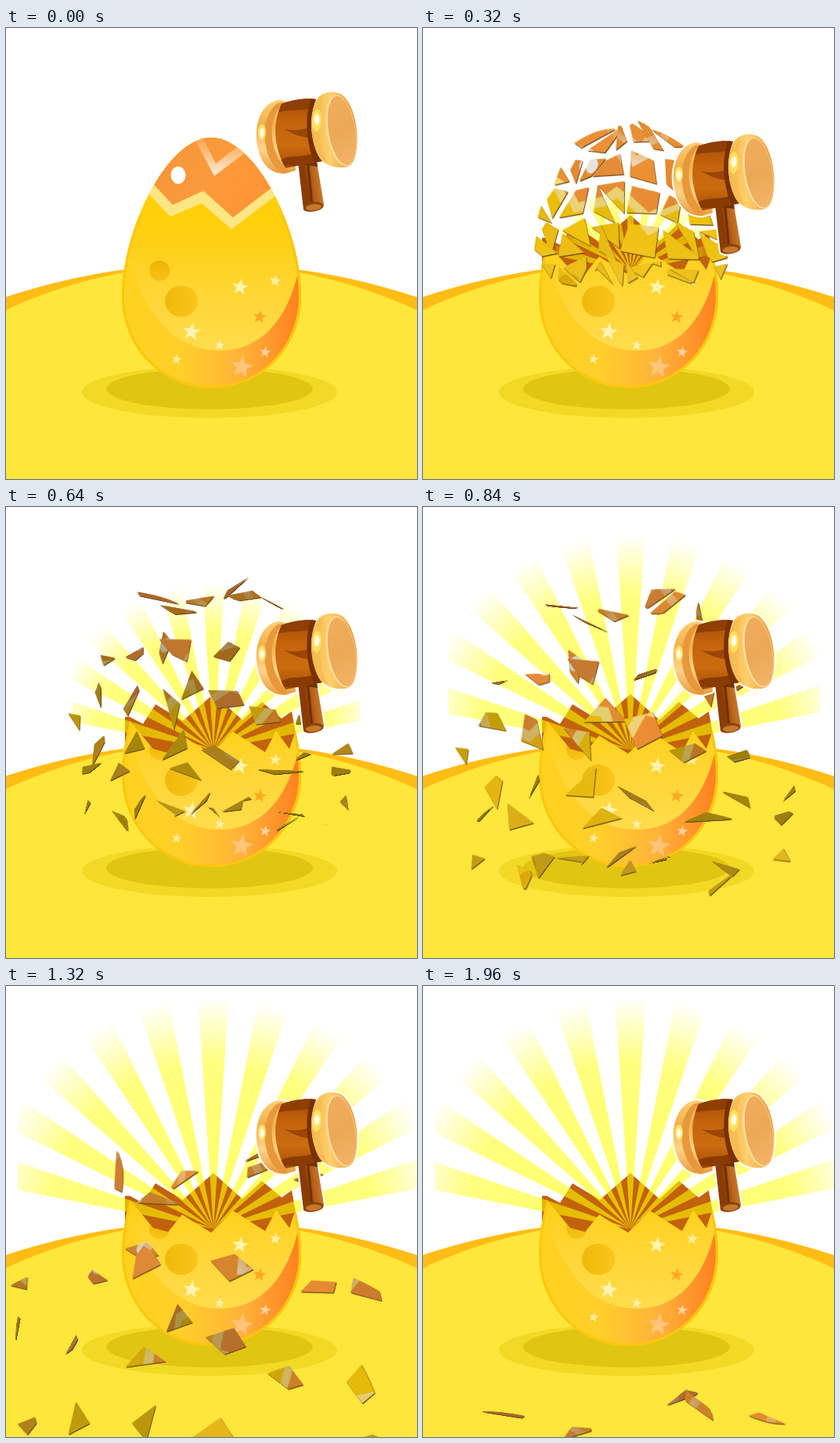
Write an HTML page with a canvas that moves like this. It is 525x576 px and loops after 2000 ms.

```html
<!DOCTYPE html>
<html lang="en">
<head>
<meta charset="utf-8">
<title>Golden egg</title>
<style>
  html, body { margin: 0; width: 100%; height: 100%; overflow: hidden; background: #fff; }
  canvas { display: block; }
</style>
</head>
<body>
<canvas id="stage" width="525" height="576"></canvas>
<script>
const W = 525, H = 576, LOOP = 2000, STEP = 40;
const BREAK = 0.2, GRAVITY = 470, TILE = 120;
const CX = 265, CY = 310;
const stage = document.getElementById('stage').getContext('2d');

const EGG = new Path2D('M262 140C205 140 148 260 148 342C148 408 198 460 262 460C327 460 377 408 377 342C377 260 320 140 262 140Z');
const RIM = 'M140 262L155 269L188 309L207 314L225 292L262 315L290 287L331 313L345 286L362 309L373 276L385 270';
const WALL = 'M152 268H158L175 277L191 252L226 273L265 239L302 272L327 249L352 270L365 261L372 300V320H152Z';

const rnd = (i, k) => {
  const v = Math.sin(i * 12.9898 + k * 78.233) * 43758.5453;
  return v - Math.floor(v);
};
const spread = (i, k, size) => (rnd(i, k) - 0.5) * size;

function layer(w, h, draw) {
  const c = document.createElement('canvas');
  c.width = w;
  c.height = h;
  draw(c.getContext('2d'));
  return c;
}

function poly(pts) {
  const p = new Path2D();
  pts.forEach(([x, y]) => p.lineTo(x, y));
  p.closePath();
  return p;
}

function fill(g, path, color) {
  g.fillStyle = color;
  g.fill(typeof path === 'string' ? new Path2D(path) : path);
}

function oval(g, x, y, rx, ry, color, tilt = 0) {
  g.beginPath();
  g.ellipse(x, y, rx, ry, tilt, 0, 7);
  g.fillStyle = color;
  g.fill();
}

function ramp(g, x0, y0, x1, y1, ...colors) {
  const r = g.createLinearGradient(x0, y0, x1, y1);
  colors.forEach((c, i) => r.addColorStop(i / (colors.length - 1), c));
  return r;
}

function star(g, x, y, r, color) {
  const pts = [];
  for (let i = 0; i < 10; i++) {
    const a = 0.15 + i * Math.PI / 5 - Math.PI / 2, d = i % 2 ? r * 0.42 : r;
    pts.push([x + d * Math.cos(a), y + d * Math.sin(a)]);
  }
  fill(g, poly(pts), color);
}

const ground = layer(W, H, g => {
  g.fillStyle = '#fff';
  g.fillRect(0, 0, W, H);
  oval(g, 262, 1130, 829, 829, '#ffbc14');
  oval(g, 262, 923, 621, 621, '#ffe63b');
  oval(g, 260, 465, 163, 33, '#f1d926');
  oval(g, 260, 461, 132, 26, '#e1c513');
});

const egg = layer(W, H, g => {
  g.clip(EGG);
  g.fillStyle = ramp(g, 148, 0, 377, 0, '#ffd21e', '#ffcf2a', '#ffb23a', '#ff7f1e');
  g.fillRect(140, 130, 250, 340);
  fill(g, 'M145 130H380V270C372 350 340 412 272 412C205 412 165 345 154 270Z',
    ramp(g, 0, 200, 0, 412, '#ffd000', '#ffcf14', '#ffd636', '#ffdc4c'));
  fill(g, 'M140 120H390V204H340L290 242L252 208L213 226L183 194Z',
    ramp(g, 190, 150, 330, 225, '#f4953a', '#fb9a3b', '#ff9434'));
  fill(g, 'M183 194L213 226L252 208L290 242L342 202L349 211L288 257L250 224L210 241L175 204Z', '#ffe684');
  fill(g, 'M239 138L266 189L310 156L300 148L268 173L250 138Z',
    ramp(g, 0, 145, 0, 186, 'rgba(255,226,180,.25)', 'rgba(255,248,235,.85)'));
  oval(g, 220, 188, 9.5, 11, '#fff');
  oval(g, 196, 310, 13, 13, ramp(g, 0, 297, 0, 323, '#eeb300', '#f8c41a'));
  oval(g, 224, 349, 21, 20, ramp(g, 203, 0, 245, 0, '#efb90c', '#fac61a'));
  star(g, 299, 331, 11, '#fff3ae');
  star(g, 344, 323, 8, '#ffeea0');
  star(g, 324, 369, 9, '#ffa821');
  star(g, 237, 388, 12, '#fff3b4');
  star(g, 273, 405, 7, '#fff0b0');
  star(g, 218, 423, 7, '#ffeb98');
  star(g, 301, 433, 15, '#ffc57a');
  star(g, 331, 414, 7.5, '#ffd09c');
  g.beginPath();
  g.rect(140, 240, 250, 230);
  g.clip();
  g.lineWidth = 6;
  g.strokeStyle = '#fcc70c';
  g.stroke(EGG);
});

// Egg below or above the broken rim
const eggPart = edge => layer(W, H, g => {
  g.clip(new Path2D(`${RIM}V${edge}H140Z`));
  g.drawImage(egg, 0, 0);
});
const bowl = eggPart(470), cap = eggPart(120);

const rays = layer(W, H, g => {
  g.beginPath();
  g.rect(15, 0, W, H);
  g.clip();
  const glow = g.createRadialGradient(CX, CY, 0, CX, CY, 295);
  glow.addColorStop(0, 'rgba(255,255,0,.62)');
  glow.addColorStop(0.72, 'rgba(255,255,0,.5)');
  glow.addColorStop(1, 'rgba(255,255,0,0)');
  g.fillStyle = glow;
  g.translate(CX, CY);
  for (let i = -5; i <= 5; i++) {
    const a = (i * 15 - 90) * Math.PI / 180, half = 3.8 * Math.PI / 180;
    g.beginPath();
    g.moveTo(0, 0);
    g.arc(0, 0, 300, a - half, a + half);
    g.save();
    g.translate(-CX, -CY);
    g.fill();
    g.restore();
  }
});

const hammer = layer(W, H, g => {
  const ring = 'M349 146C326 149 318 176 320 198C323 226 337 241 357 240L370 236L364 149Z';
  const body = 'M352 151C340 176 342 206 357 233L404 224C388 200 386 170 396 145C380 143 365 146 352 151Z';
  const drum = 'M398 144C404 136 418 133 429 139C444 150 451 184 448 207C446 225 441 232 430 232C419 233 409 229 402 222C388 202 386 163 398 144Z';
  const grip = 'M372 216L396 219L406 279C406 287 386 292 380 286Z';
  g.lineWidth = 4;
  g.lineJoin = 'round';
  g.strokeStyle = '#fff';
  for (const p of [ring, drum, grip]) g.stroke(new Path2D(p));

  fill(g, grip, ramp(g, 374, 250, 402, 246, '#8a3c04', '#8a3c04', '#b8631a', '#c77a2e'));
  fill(g, 'M372 216L396 219L398 231L374 228Z', '#6f2f04');
  fill(g, 'M384 226L387 226L392 277L389 277Z', '#6f2f04');
  oval(g, 393, 282, 12.5, 6, '#8a4508', -0.1);
  oval(g, 393, 283, 10, 4, '#c9782a', -0.1);

  fill(g, ring, ramp(g, 0, 146, 0, 240, '#ffcf74', '#f3b04c', '#ffd489', '#e89b3c'));
  fill(g, 'M347 150C333 160 329 180 331 200C334 220 342 233 353 239L360 237C345 222 338 200 340 180C342 165 348 154 356 149Z', '#e8983a');
  oval(g, 327, 187, 5, 10, '#ffe26a');
  oval(g, 327, 188, 3, 6, '#fffbe0');

  g.save();
  g.clip(new Path2D(body));
  g.fillStyle = ramp(g, 0, 145, 0, 233, '#a04a06', '#c4640d', '#cc6c10', '#a34c06');
  g.fillRect(335, 140, 80, 100);
  fill(g, 'M345 150L398 142V154C376 162 362 156 344 163Z', '#8e3f06');
  fill(g, 'M398 176C384 184 370 186 356 183C370 192 384 196 398 194Z', '#9b4606');
  fill(g, 'M352 222C368 214 380 222 402 210V230H352Z', '#8a3b02');
  fill(g, 'M390 142C380 170 384 206 396 230H406V142Z', '#7a3102');
  g.restore();

  fill(g, drum, ramp(g, 388, 0, 440, 0, '#f2b348', '#ffd06c', '#eda347'));
  fill(g, 'M398 146C390 165 390 200 404 222L411 226C398 204 397 168 406 142Z', '#f7bd55');
  oval(g, 428, 185, 18.5, 46, '#ffdd9a', -0.16);
  oval(g, 429, 185, 17, 44.5, ramp(g, 410, 150, 446, 220, '#f0ac5c', '#eba956', '#f3b265'), -0.16);
  oval(g, 397, 172, 6, 14, '#ffe05e', 0.05);
  oval(g, 397, 171, 3.5, 7, '#fffbe2', 0.05);
});

// Corner of the crack net: columns follow the width of the shell
const ROWS = 5, COLS = 6;
function corner(row, col) {
  const id = row * 10 + col, inner = col > 0 && col < COLS;
  const y = 134 + row * 38;
  const half = 10 + 114 * Math.sqrt(Math.max(0, 1 - ((342 - y) / 202) ** 2));
  return [
    262 + half * (2 * col / COLS - 1) + (inner ? spread(id, 1, 18) : 0),
    y + (row ? spread(id, 2, 18) : 0)
  ];
}

function makeShard(cell, i) {
  const mean = k => cell.reduce((sum, p) => sum + p[k], 0) / cell.length;
  const x = mean(0), y = mean(1);
  const face = layer(TILE, TILE, g => {
    g.translate(TILE / 2 - x, TILE / 2 - y);
    g.clip(poly(cell));
    g.drawImage(cap, 0, 0);
  });
  const shade = layer(TILE, TILE, g => {
    g.drawImage(face, 0, 0);
    g.globalCompositeOperation = 'source-in';
    g.fillStyle = i % 3 ? '#5c4608' : '#6b4420';
    g.fillRect(0, 0, TILE, TILE);
  });
  return {
    x, y, face, shade,
    vx: (x - 264) * 1.6 + spread(i, 3, 80),
    vy: (y - 175) * 1.8 - 140 + spread(i, 4, 50),
    axis: rnd(i, 5) * Math.PI,
    spin: spread(i, 6, 5),
    flip: 2 + rnd(i, 7) * 4
  };
}

const cells = [];
for (let r = 0; r < ROWS; r++) {
  for (let c = 0; c < COLS; c++) {
    const [a, b, d, e] = [corner(r, c), corner(r, c + 1), corner(r + 1, c + 1), corner(r + 1, c)];
    if (rnd(r, c + 20) < r * 0.2) cells.push([a, b, d], [a, d, e]);
    else cells.push([a, b, d, e]);
  }
}
const shards = cells.map(makeShard);

function drawShard(s, u) {
  const x = s.x + s.vx * u, y = s.y + s.vy * u + GRAVITY / 2 * u * u;
  if (y > H + TILE) return;
  const turn = s.flip * u, c = Math.cos(turn);
  const squash = Math.sign(c) * Math.max(Math.abs(c), 0.12);
  const put = (img, dx, dy, alpha) => {
    stage.save();
    stage.globalAlpha = alpha;
    stage.translate(x + dx, y + dy);
    stage.rotate(s.axis);
    stage.scale(0.95, 0.95 * squash);
    stage.rotate(s.spin * u - s.axis);
    stage.drawImage(img, -TILE / 2, -TILE / 2);
    stage.restore();
  };
  put(s.shade, 0.8, 1.2, 1);
  put(s.face, 0, 0, 1);
  put(s.shade, 0, 0, Math.min(1, u * 3) * (0.12 + 0.5 * Math.abs(Math.sin(turn))));
}

function render(ms) {
  const t = ms / 1000, u = t - BREAK;
  stage.drawImage(ground, 0, 0);
  if (u < 0) {
    stage.drawImage(egg, 0, 0);
  } else {
    const k = Math.min(1, 0.38 + 1.06 * (t - 0.32));
    fill(stage, WALL, '#c2620c');
    stage.save();
    stage.translate(CX, CY);
    stage.scale(k, k);
    stage.drawImage(rays, -CX, -CY);
    stage.restore();
    stage.drawImage(bowl, 0, 0);
    shards.forEach(s => drawShard(s, u));
  }
  const fall = Math.min(1, t / 0.16);
  stage.drawImage(hammer, 0, -54 * (1 - fall * fall));
}

const start = performance.now();
function tick() {
  const ms = (performance.now() - start) % LOOP;
  render(Math.floor(ms / STEP) * STEP);
  requestAnimationFrame(tick);
}
tick();
</script>
</body>
</html>
```
